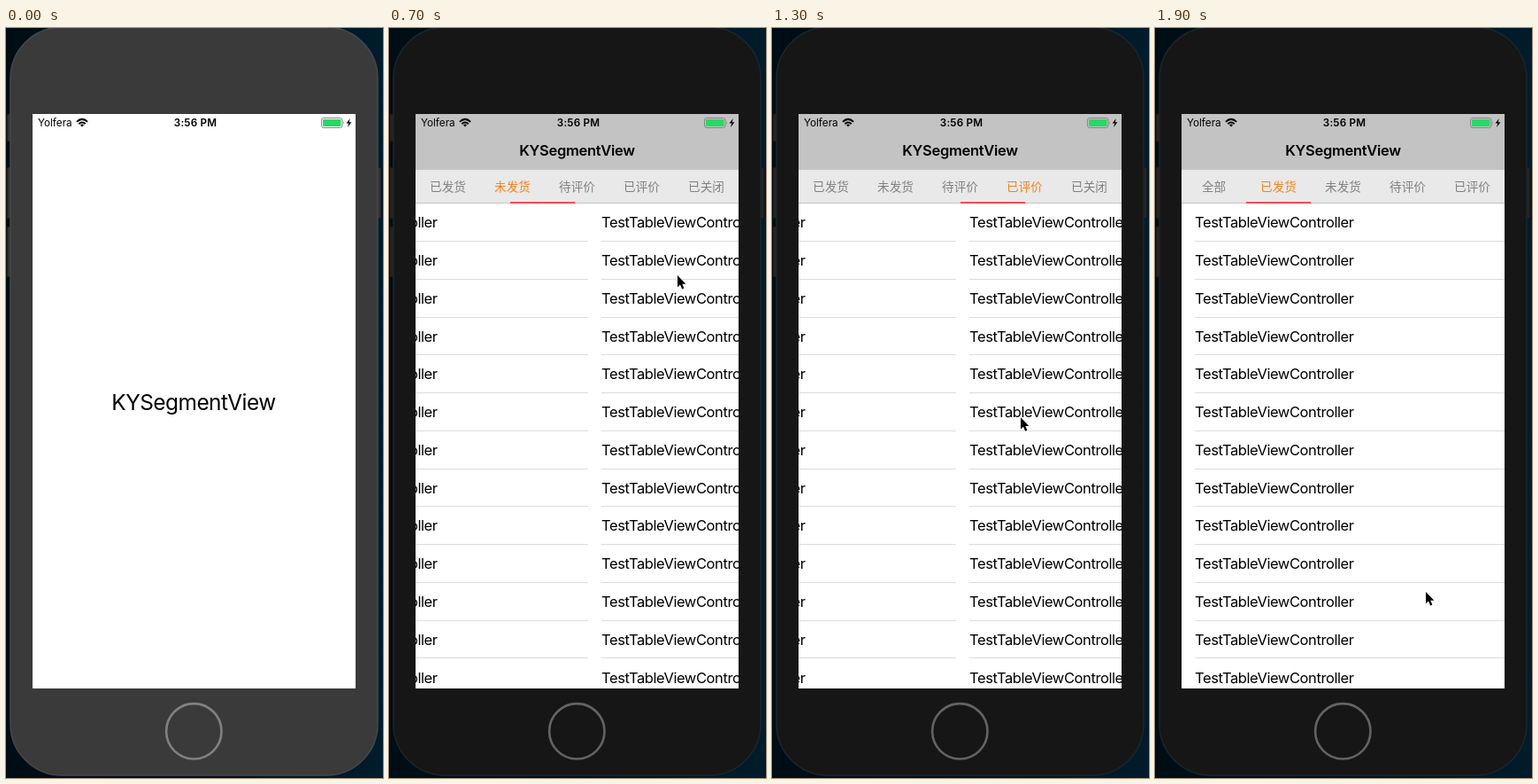
These frames come from a looping animation (426 px wide and 846 px high, 2 s). An HTML page:

```html
<!DOCTYPE html>
<html lang="zh-CN">
<head>
<meta charset="utf-8">
<title>KYSegmentView</title>
<style>
  html, body { margin: 0; width: 100%; height: 100%; overflow: hidden; background: #00101a; }
  svg { display: block; width: 426px; height: 846px; font-family: Inter, "Open Sans", sans-serif; }
  #shell { fill: #161616; stroke: #1b262c; stroke-width: 1.5; }
  #home { fill: none; stroke: #636363; stroke-width: 2.6; }
  .side { fill: #262424; stroke: #111; }
  .splash #shell { fill: #3a3a3a; stroke: #45484a; }
  .splash #home { stroke: #818181; }
  .splash .side { fill: #333131; }
  .splash #app, .splash #cursor { display: none; }
  svg:not(.splash) #intro { display: none; }
  .row { font-size: 16.5px; letter-spacing: -.025em; }
  .rule { fill: #dcdcdc; shape-rendering: crispEdges; }
  .status { font-size: 11.7px; }
  .bold { font-weight: 600; }
  .mid { text-anchor: middle; }
  #tabs text {
    font: 13.6px "Noto Sans CJK SC", "Noto Sans CJK", sans-serif;
    fill: #808080; text-anchor: middle;
  }
  #tabs text.on { fill: #f5821f; }
</style>
</head>
<body>
<svg id="stage" class="splash" viewBox="0 0 426 846">
  <defs>
    <linearGradient id="desk">
      <stop offset="0" stop-color="#000d15"/>
      <stop offset=".5" stop-color="#001019"/>
      <stop offset="1" stop-color="#011c2c"/>
    </linearGradient>
    <clipPath id="screen"><rect x="30" y="97" width="365" height="648"/></clipPath>
  </defs>

  <rect width="426" height="846" fill="url(#desk)"/>
  <rect class="side" x="1" y="97" width="8" height="31" rx="1"/>
  <rect class="side" x="1" y="157" width="8" height="58" rx="1"/>
  <rect class="side" x="1" y="224" width="8" height="57" rx="1"/>
  <rect class="side" x="416" y="157" width="8" height="58" rx="1"/>
  <rect id="shell" x="5" y="-1" width="415" height="844" rx="58"/>
  <circle id="home" cx="212.3" cy="793.3" r="31.2"/>

  <g clip-path="url(#screen)">
    <rect x="30" y="97" width="365" height="648" fill="#fff"/>
    <text id="intro" class="mid" x="212" y="430.5" font-size="24.4" letter-spacing="-.5">KYSegmentView</text>
    <g id="app">
      <g id="pages"></g>
      <rect x="30" y="97" width="365" height="63" fill="#c3c3c3"/>
      <text class="mid bold" x="212.5" y="144" font-size="16.5" letter-spacing="-.3">KYSegmentView</text>
      <rect x="30" y="160" width="365" height="37" fill="#e9e9e9"/>
      <rect x="30" y="197" width="365" height="1" fill="#c4c4c4"/>
      <g id="tabs"></g>
      <rect id="underline" x="30" y="196" width="73" height="2" fill="#ff4b55"/>
    </g>

    <text class="status" x="36" y="111.2">Yolfera</text>
    <g fill="none" stroke="#000" stroke-width="2">
      <path d="M79.9 105.9Q86 99.9 92.1 105.9M82.3 108.3Q86 104.7 89.7 108.3"/>
      <path d="M84 109.4Q86 107.8 88 109.4L86 111.6Z" fill="#000" stroke="none"/>
    </g>
    <text class="status bold mid" x="214" y="111.2" letter-spacing=".2">3:56 PM</text>
    <rect x="356.5" y="101.5" width="23.5" height="11" rx="2.5" fill="none" stroke="#878787"/>
    <rect x="358" y="103" width="20.5" height="8" rx="1" fill="#27d964"/>
    <path d="M381.1 105.2q1.6 1.8 0 3.6z" fill="#878787"/>
    <path d="M388.8 102L384.6 107.6H387.2L386 112L390.4 106.2H387.7Z"/>
  </g>

  <path id="cursor" d="M0 1V14.2L3 11.6L5.2 16.6L7.4 15.6L5.3 10.8H9.4Z" stroke="#fff" stroke-width="1.2" paint-order="stroke"/>
</svg>
<script>
const STEP = 100, STEPS = 20, PAGE = 365, TAB = 73, ROW = 42.77;
const LABELS = ['全部', '已发货', '未发货', '待评价', '已评价', '已关闭'];
const $ = id => document.getElementById(id);

// [step, value...] keys, joined by straight lines
const PAGE_KEYS = [[1, 0], [2, .5], [3, 1], [4, 1], [5, 2], [6, 3], [7, 2.466], [9, .433],
  [11, 1.984], [12, 3], [15, 4.534], [16, 4], [19, 1]];
const CURSOR_KEYS = [[1, 150, 290], [2, 139, 182], [3, 160, 180], [4, 214.5, 178], [5, 287, 180],
  [6, 318, 215], [7, 326, 278], [9, 301, 375], [11, 256, 422], [15, 306, 454.5], [19, 306, 635]];

function sample(keys, step) {
  const next = keys.findIndex(k => k[0] >= step);
  if (next <= 0) return keys[0].slice(1);
  const [a, b] = [keys[next - 1], keys[next]];
  const mix = (step - a[0]) / (b[0] - a[0]);
  return a.slice(1).map((v, i) => v + (b[i + 1] - v) * mix);
}

function add(parent, tag, attrs, text = '') {
  const el = document.createElementNS('http://www.w3.org/2000/svg', tag);
  for (const name in attrs) el.setAttribute(name, attrs[name]);
  el.textContent = text;
  return parent.appendChild(el);
}

const tabs = LABELS.map((label, i) => {
  for (let r = 0; r < 13; r++) {
    const x = 45 + PAGE * i;
    add($('pages'), 'text', { class: 'row', x, y: 225.3 + ROW * r }, 'TestTableViewController');
    add($('pages'), 'rect', { class: 'rule', x, y: Math.floor(240.5 + ROW * r), width: 350, height: 1 });
  }
  return add($('tabs'), 'text', { x: 66.5 + TAB * i, y: 184 }, label);
});

const move = (id, x, y = 0) => $(id).setAttribute('transform', `translate(${x} ${y})`);

function draw(now) {
  const step = Math.floor(now / STEP) % STEPS;
  const [page] = sample(PAGE_KEYS, step);
  const scrolled = step === 6 || step === 7 || (step >= 13 && step <= 17) ? 1 : 0;

  $('stage').classList.toggle('splash', step === 0);
  move('pages', Math.round(-page * PAGE));
  move('tabs', -scrolled * TAB);
  move('underline', Math.round((page - scrolled) * TAB));
  move('cursor', ...sample(CURSOR_KEYS, step));
  tabs.forEach((tab, i) => tab.classList.toggle('on', i === Math.round(page)));
}

function loop(now) {
  draw(now);
  requestAnimationFrame(loop);
}
draw(0);
requestAnimationFrame(loop);
</script>
</body>
</html>
```
